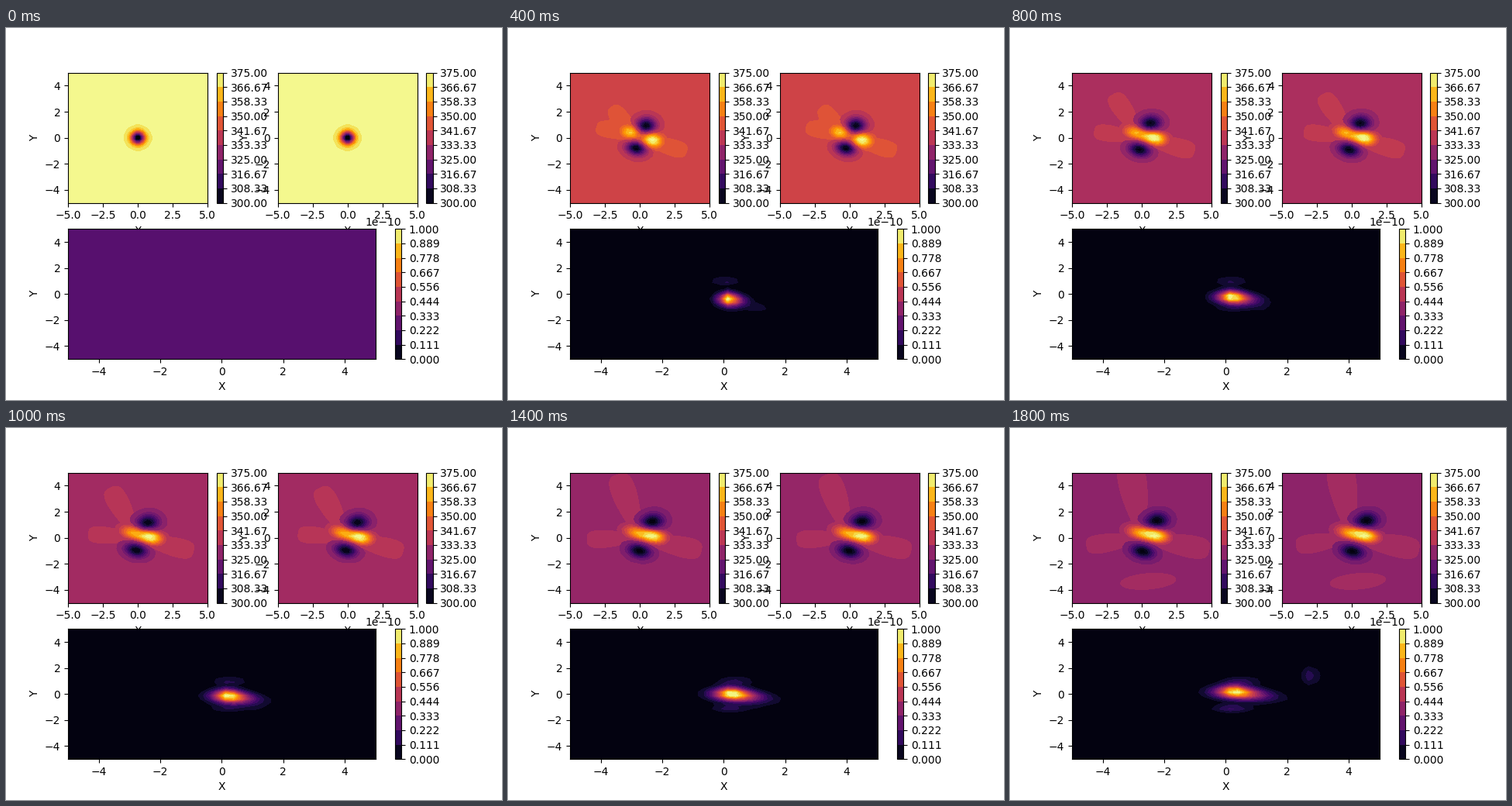
Write a matplotlib script that moves like this. It is 640 px wide and 480 px high and loops after 2 s.

```python
import numpy as np
import matplotlib.pyplot as plt
from matplotlib.animation import FuncAnimation
from matplotlib.patches import Ellipse, Polygon

FRAMES, STEP_MS = 10, 200
BAND = 0.055
CMAP = plt.get_cmap("inferno")

axis = np.linspace(-5, 5, 40)
X, Y = np.meshgrid(axis, axis)


def bump(x0, y0, sx, sy, tilt=0.0):
    dx, dy = X - x0, Y - y0
    c, s = np.cos(tilt), np.sin(tilt)
    a, b = c * dx + s * dy, c * dy - s * dx
    return np.exp(-0.5 * ((a / sx) ** 2 + (b / sy) ** 2))


def heat_shape(i):
    """Two hot spots merging into a streak between two drifting cold spots."""
    g = np.log2(i)
    lx, ly = -0.8 + 0.16 * g, 0.42
    rx, ry = 0.8 + 0.03 * i, -0.33 + 0.17 * g
    hot = 0.42 + 0.06 * g, 0.35, -0.25
    cold = 0.5 + 0.04 * g
    return ((0.5 + 0.5 / i) * bump(lx, ly, *hot)
            + bump(rx, ry, *hot)
            + (0.5 - 0.9 / i) * bump((lx + rx) / 2, (ly + ry) / 2, *hot)
            - bump(0.24 + 0.09 * i, 0.7 + 0.18 * g, cold, 0.48, 0.25)
            - bump(-0.35 + 0.045 * i, -0.68 - 0.115 * g, cold, 0.4, -0.25))


def error_field(i):
    """A skewed peak that stretches to the right, with faint side lobes."""
    g = np.log2(i)
    dx = X - 0.11 - 0.02 * i
    sx = np.where(dx < 0, 0.15 + 0.13 * g, 0.2 + 0.2 * g)
    dy = Y + 0.55 - 0.08 * i + 0.28 * np.maximum(dx, 0)
    z = np.exp(-np.abs(dx / sx) ** 1.5 - 0.5 * (dy / 0.33) ** 2)
    z /= z.max()
    z += 0.13 * bump(-0.1 + 0.07 * i, 1.0, 0.3 + 0.015 * i, 0.22)
    z += 0.02 * i * bump(0.2, -1.1, 0.42, 0.22)
    z += 0.2 / i * bump(1.15, -1.07, 0.22, 0.18)
    z += 0.05 * max(i - 6, 0) * bump(2.75, 1.4, 0.2, 0.5)
    return z / z.max()


def arms_outline(w):
    """Three blunt arms around the centre; w runs from 0 (early) to 1 (late)."""
    theta = np.linspace(-180, 180, 240, endpoint=False)
    r = np.ones_like(theta)
    # angle and length of each arm, early then late
    for a0, a1, n0, n1 in ((165, 189, 2.2, 3.0),
                           (131, 99, 2.1, 4.9),
                           (-18, -11, 2.5, 3.9)):
        off = (theta - a0 - w * (a1 - a0) + 180) % 360 - 180
        r += (n0 + w * (n1 - n0)) * np.exp(-(off / 17) ** 4)
    rad = np.radians(theta)
    return np.column_stack([r * np.cos(rad), r * np.sin(rad)])


def make_axes(pos, low, high):
    ax = fig.add_subplot(*pos)
    ramp = low + (high - low) * (X + 5) / 10
    cs = ax.contourf(X, Y, ramp, levels=np.linspace(low, high, 10), cmap=CMAP)
    fig.colorbar(cs, ax=ax)
    cs.remove()
    ax.set(xlim=(-5, 5), ylim=(-5, 5), xlabel="X", ylabel="Y")
    return ax


fig = plt.figure(figsize=(6.4, 4.8), dpi=100)
left = make_axes((2, 2, 1), 300, 375)
right = make_axes((2, 2, 2), 300, 375)
bottom = make_axes((2, 1, 2), 0, 1e-10)
drawn = []


def draw_bands(ax, z, base, band=BAND):
    """Fill bands centred on base; the base band itself shows the backdrop."""
    k = np.arange(-20, 21)
    colors = CMAP(np.clip(base + band * k, band / 2, 1 - band / 2))
    colors[k == 0] = 0
    levels = base + band * (np.arange(-20, 22) - 0.5)
    ax.set_facecolor(CMAP(base))
    drawn.append(ax.contourf(X, Y, z, levels=levels, colors=colors))


def draw_patch(ax, patch, value):
    patch.set(facecolor=CMAP(value), edgecolor="none",
              antialiased=False, zorder=0.5)
    drawn.append(ax.add_patch(patch))


def draw_heat(ax, i):
    base = 0.27 + 0.43 * i ** -0.6
    shape = heat_shape(i)
    z = base + np.where(shape < 0, -shape * base / shape.min(),
                        shape * (1 - base) / shape.max())
    if i >= 2:
        draw_patch(ax, Polygon(arms_outline((i - 2) / 7)), base + BAND)
    if i >= 8:
        size = np.sqrt(i - 7)
        south = Ellipse((0.45, -3.35), 2.8 * size, 0.85 * size, angle=5)
        draw_patch(ax, south, base + BAND)
    draw_bands(ax, z, base)


def update(i):
    while drawn:
        drawn.pop().remove()
    if i == 0:
        dip = bump(0, 0, 0.35, 0.35)
        for ax in (left, right):
            draw_bands(ax, 0.975 * (1 - dip / dip.max()), 0.975, 0.05)
        bottom.set_facecolor(CMAP(0.25))
        return drawn
    for ax in (left, right):
        draw_heat(ax, i)
    draw_bands(bottom, error_field(i), BAND / 2)
    return drawn


anim = FuncAnimation(fig, update, frames=FRAMES, interval=STEP_MS,
                     init_func=lambda: update(0), repeat=True,
                     repeat_delay=0, blit=False)
plt.show()
```
